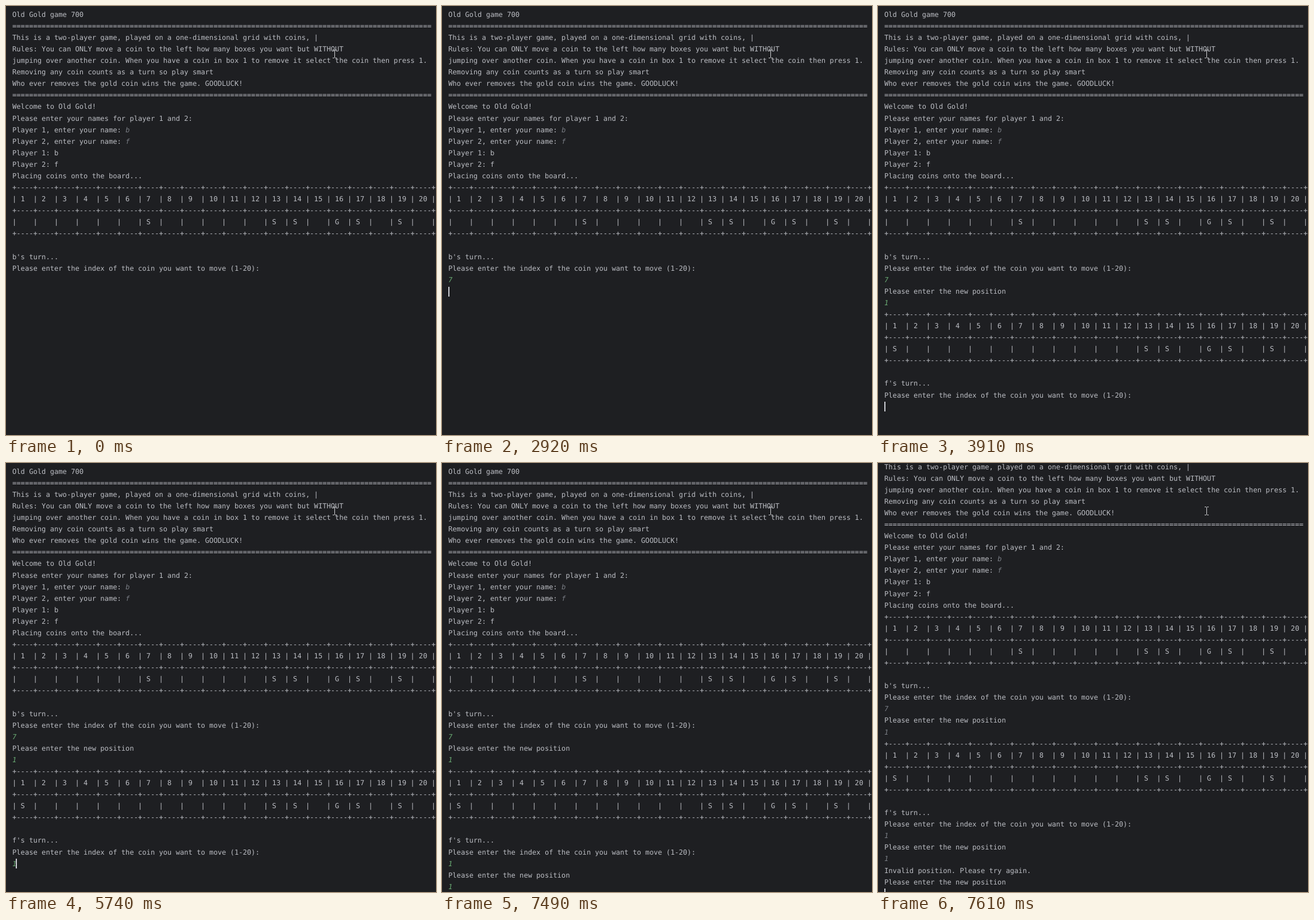
Recreate the animation shown at these times as an HTML page. Size 749x747 px, loop 8 s.

```html
<!DOCTYPE html>
<html lang="en">
<head>
<meta charset="utf-8">
<title>Coin game console</title>
<style>
  html, body { margin: 0; width: 100%; height: 100%; overflow: hidden; background: #1e1f22; }
  svg { display: block; width: 749px; height: 747px; }
  text {
    font: 12.14px "DejaVu Sans Mono", "Noto Sans Mono", monospace;
    text-rendering: geometricPrecision;
    white-space: pre;
    fill: #bcbec4;
  }
  .typed { font-style: italic; fill: #6aab73; }
  .old { font-style: italic; fill: #7a7e85; }
  #caret { fill: #ced0d6; }
  #mouse { fill: none; stroke: #d4d5d8; }
</style>
</head>
<body>
<svg viewBox="0 0 749 747">
  <g id="page"><rect id="caret" width="2" height="17"/></g>
  <path id="mouse" d="M569 76.5h2.5l1 1l1 -1h2.5M572.5 77v13M569 90.5h2.5l1 -1l1 1h2.5"/>
</svg>
<script>
const LOOP = 8000, LEFT = 11, CELL = 7.31, PITCH = 20.083, SCROLL_AT = 7510;
const BASELINE = 18.8, CARET_TOP = 6.55;
const page = document.getElementById("page");
const caret = document.getElementById("caret");

const rule = "=".repeat(100);
const edge = "+----".repeat(20) + "+";
const boxes = fill => Array.from({ length: 20 }, (_, i) =>
  "| " + String(fill(i + 1)).padEnd(3)).join("") + "|";
const board = coins => [edge, boxes(n => n), edge, boxes(n => coins[n] || ""), edge, ""];
const right = { 13: "S", 14: "S", 16: "G", 17: "S", 19: "S" };
const askCoin = "Please enter the index of the coin you want to move (1-20):";
const askSpot = "Please enter the new position";

// Output in order: [time, lines]; a leading ">" marks typed input
const output = [
  [0, [
    "Old Gold game 700",
    rule,
    "This is a two-player game, played on a one-dimensional grid with coins, |",
    "Rules: You can ONLY move a coin to the left how many boxes you want but WITHOUT",
    "jumping over another coin. When you have a coin in box 1 to remove it select the coin then press 1.",
    "Removing any coin counts as a turn so play smart",
    "Who ever removes the gold coin wins the game. GOODLUCK!",
    rule,
    "Welcome to Old Gold!",
    "Please enter your names for player 1 and 2:",
    "Player 1, enter your name: ",
    "Player 2, enter your name: ",
    "Player 1: b",
    "Player 2: f",
    "Placing coins onto the board...",
    ...board({ 7: "S", ...right }),
    "b's turn...",
    askCoin
  ]],
  [2620, [">7"]],
  [3110, [askSpot]],
  [3480, [">1"]],
  [3910, [...board({ 1: "S", ...right }), "f's turn...", askCoin]],
  [5740, [">1"]],
  [6030, [askSpot]],
  [7190, [">1"]],
  [SCROLL_AT, ["Invalid position. Please try again.", askSpot]]
];

// Caret: [time, row, column]; row -1 hides it
const carets = [
  [0, -1, 0], [270, 23, 0], [750, -1, 0], [1240, 23, 0], [1730, -1, 0], [2220, 23, 0],
  [2620, 23, 1], [2920, 24, 0], [3110, 25, 0], [3480, 25, 1],
  [3910, 34, 0], [4710, -1, 0], [5210, 34, 0], [5690, -1, 0], [5740, 34, 1],
  [6030, 36, 0], [6690, -1, 0], [7190, 36, 1], [7490, -1, 0], [7610, 39, 0]
];
const scrolls = [[0, 0], [SCROLL_AT, 8.15], [7610, 48.3]];

const lines = [];
function addText(time, row, col, str, kind) {
  const el = document.createElementNS("http://www.w3.org/2000/svg", "text");
  el.setAttribute("x", LEFT + col * CELL);
  el.setAttribute("class", kind);
  el.textContent = str;
  page.insertBefore(el, caret);
  lines.push({ time, row, el, typed: kind === "typed" });
}

let nextRow = 0;
for (const [time, strs] of output) {
  for (const str of strs) {
    const typed = str[0] === ">";
    addText(time, nextRow++, 0, typed ? str.slice(1) : str, typed ? "typed" : "");
  }
}
addText(0, 10, 27, "b", "old");
addText(0, 11, 27, "f", "old");

const current = (steps, t) => steps.filter(s => s[0] <= t).pop();

function draw(t) {
  const scroll = current(scrolls, t)[1];
  const rowY = (base, row) => Math.round(base + row * PITCH - scroll);
  for (const { time, row, el, typed } of lines) {
    el.style.display = t >= time ? "" : "none";
    el.setAttribute("y", rowY(BASELINE, row));
    if (typed) el.setAttribute("class", t >= SCROLL_AT ? "old" : "typed");
  }
  const [, row, col] = current(carets, t);
  caret.style.display = row < 0 ? "none" : "";
  caret.setAttribute("x", LEFT + col * 6);
  caret.setAttribute("y", rowY(CARET_TOP, row));
}

const start = performance.now();
function tick() {
  draw((performance.now() - start) % LOOP);
  requestAnimationFrame(tick);
}
tick();
</script>
</body>
</html>
```
